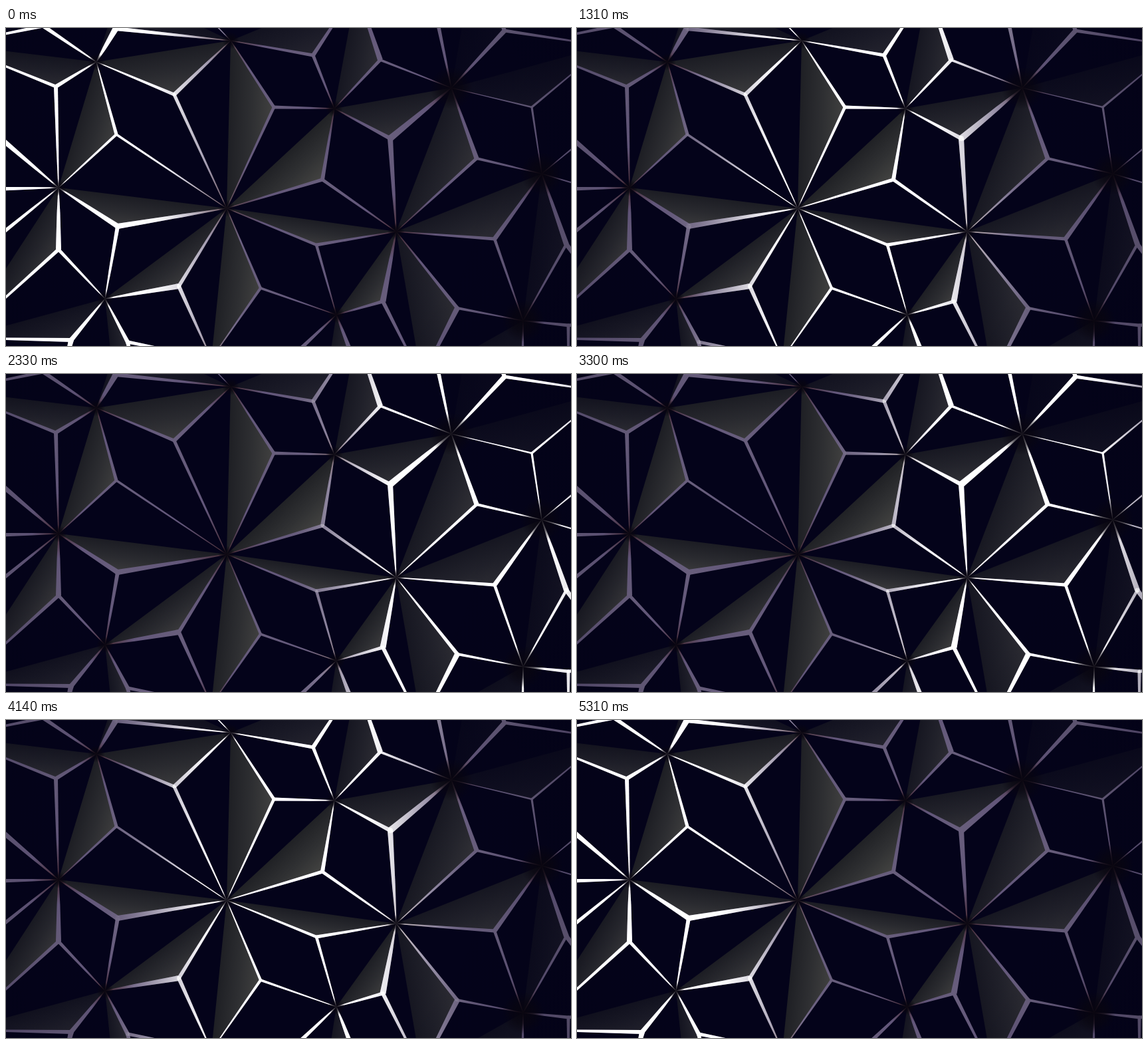
An HTML page that plays this animation: 850x478 px, repeating every 5480 ms.

```html
<!DOCTYPE html>
<html lang="en">
<head>
<meta charset="utf-8">
<title>Faceted wall</title>
<style>
  html, body { margin: 0; width: 100%; height: 100%; overflow: hidden; background: #04031a; }
  svg { display: block; width: 850px; height: 478px; }
</style>
</head>
<body>
<svg viewBox="0 0 850 478">
  <defs>
    <linearGradient id="band" gradientUnits="userSpaceOnUse" x1="-175" y1="0" x2="380" y2="0"></linearGradient>
    <radialGradient id="pit">
      <stop offset="0" stop-color="#08050f" stop-opacity=".95"/>
      <stop offset=".5" stop-color="#08050f" stop-opacity=".65"/>
      <stop offset="1" stop-color="#08050f" stop-opacity="0"/>
    </radialGradient>
    <radialGradient id="shade" gradientUnits="userSpaceOnUse" cx="400" cy="235" r="540">
      <stop offset=".55" stop-color="#020110" stop-opacity="0"/>
      <stop offset="1" stop-color="#020110" stop-opacity=".25"/>
    </radialGradient>
  </defs>
  <rect width="850" height="478" fill="#04031a"/>
  <g id="faces"></g>
  <g id="gaps"></g>
  <rect width="850" height="478" fill="url(#shade)"/>
  <g id="light" fill="url(#band)"></g>
  <g id="pits"></g>
</svg>
<script>
const NS = 'http://www.w3.org/2000/svg';
const $ = id => document.getElementById(id);
const defs = document.querySelector('defs');
const band = $('band');

function add(parent, tag, attrs) {
  const el = document.createElementNS(NS, tag);
  for (const key in attrs) el.setAttribute(key, attrs[key]);
  parent.appendChild(el);
  return el;
}

let gradients = 0;
function gradient(x1, y1, x2, y2, stops) {
  const id = 'g' + gradients++;
  const el = add(defs, 'linearGradient', { id, gradientUnits: 'userSpaceOnUse', x1, y1, x2, y2 });
  for (const [offset, color] of stops) add(el, 'stop', { offset, 'stop-color': color });
  return `url(#${id})`;
}

// Peaks where facets meet; several lie outside the stage.
const hubs = {
  A: [136, 51], B: [338, 19], C: [494, 121], D: [670, 90], E: [806, 219],
  F: [79, 240], G: [332, 271], H: [587, 306], I: [149, 407], J: [497, 431],
  K: [778, 440], L: [309, 497], M: [625, 526], N: [-68, 466], O: [-81, 25],
  P: [527, -58], Q: [165, 560], R: [902, 27], S: [172, -60], T: [705, -110],
  U: [88, 510], V: [192, 510], W: [480, 540], X: [846, 540], Y: [930, 440]
};

// A bright facet spans two hubs and the joint, dark along the ridge between the hubs.
function face(x, y, pair, level) {
  const [[ax, ay], [bx, by]] = [...pair].map(name => hubs[name]);
  const dx = bx - ax, dy = by - ay;
  const u = ((x - ax) * dx + (y - ay) * dy) / (dx * dx + dy * dy);
  const fill = gradient(ax + u * dx, ay + u * dy, x, y,
    [[0, '#202125'], [.5, '#303133'], [1, '#444442']]);
  add($('faces'), 'polygon', { points: [x, y, ax, ay, bx, by].join(' '), fill, opacity: level });
}

// A gap is wide at the joint and narrows towards the hub, faster at the end.
function gap(x, y, [hx, hy], width) {
  const dx = hx - x, dy = hy - y, len = Math.hypot(dx, dy);
  const at = (u, half) => [x + dx * u - dy / len * half, y + dy * u + dx / len * half];
  const outline = [[0, width / 2], [.6, width * .3], [1, .5]];
  const left = outline.map(([u, half]) => at(u, half));
  const right = outline.map(([u, half]) => at(u, -half)).reverse();
  const points = [...left, ...right].join(' ');
  const fill = gradient(x, y, hx, hy, [[0, '#685e7c'], [.6, '#62567a'], [1, '#4a2d34']]);
  add($('gaps'), 'polygon', { points, fill });
  add($('light'), 'polygon', { points });
}

// widths: gap width per hub; lit: brightness of bright facets per hub pair
function joint(x, y, widths, lit = {}) {
  for (const pair in lit) face(x, y, pair, lit[pair]);
  for (const name in widths) gap(x, y, hubs[name], widths[name]);
  const sorted = Object.values(widths).sort((a, b) => b - a);
  const r = (sorted[1] || sorted[0]) / 2;
  add($('gaps'), 'circle', { cx: x, cy: y, r, fill: '#685e7c' });
  add($('light'), 'circle', { cx: x, cy: y, r });
}

joint(56, -3, { A: 6, O: 5 });
joint(165, 1, { A: 9, B: 6, S: 6 }, { SA: .5, BS: .45 });
joint(75, 88, { A: 6, O: 5, F: 6 }, { AO: .65 });
joint(166, 160, { A: 5, F: 4, G: 3.4 }, { AF: .9 });
joint(253, 100, { A: 5, B: 6, G: 5 }, { AB: .85 });
joint(403, 119, { B: 5, C: 5, G: 4.5 }, { BG: .95 });
joint(462, 41, { B: 5, C: 5, P: 6 }, { BP: .5 });
joint(563, 48, { C: 5, D: 3.5, P: 8 }, { CP: .65 });
joint(578, 166, { C: 6, D: 10, H: 8 }, { CD: .7 });
joint(708, 196, { D: 7, E: 4, H: 5 }, { DH: .7 });
joint(476, 228, { C: 6, G: 5, H: 5 }, { CG: 1 });
joint(168, 298, { F: 8, G: 8, I: 6 }, { FG: .85 });
joint(79, 333, { F: 8, I: 5, N: 5.5 }, { FN: .8 });
joint(260, 388, { I: 8, G: 5.5, L: 6 }, { GI: .85 });
joint(383, 391, { G: 4, J: 3.5, L: 4 }, { GL: .95 });
joint(467, 326, { G: 4.5, H: 5, J: 4.5 }, { GH: .85 });
joint(567, 411, { H: 9, J: 5, M: 6 }, { HJ: .9 });
joint(679, 421, { H: 5.5, K: 4, M: 8 }, { HM: .65 });
joint(735, 317, { H: 5, E: 7, K: 4.5 }, { EH: .65 });
joint(791, 119, { D: 2.4, E: 3.2, R: 3.4 }, { DR: .25 });
joint(843, 325, { E: 8, K: 4.5, Y: 7 }, { EK: .3 });
joint(750, 4, { D: 7, R: 5, T: 6 }, { DT: .12 });
joint(98, 469, { I: 7, N: 6, U: 8 }, { IN: .5 });
joint(183, 472, { I: 6, L: 5, V: 6 }, { IQ: .6 });
joint(846, 447, { K: 5, X: 5, Y: 5 });

// Joints beyond the edges of the stage
joint(314, -6, { B: 2 });
joint(648, -15, { D: 6 });
joint(-15, 160, { F: 8 });
joint(-20, 242, { F: 6 });
joint(-20, 320, { F: 6 });
joint(440, 485, { J: 6 });
joint(519, 488, { J: 7 }, { JW: .6 });
joint(777, 520, { K: 5 }, { KM: .4 });
joint(880, 158, { E: 3 });
joint(880, 241, { E: 3 });

// Hubs sink into the dark, more deeply on the right side.
for (const [cx, cy] of Object.values(hubs)) {
  add($('pits'), 'circle', { cx, cy, r: cx > 640 ? 32 : 13, fill: 'url(#pit)' });
}

// Light profile: soft rise, plateau, soft fall
const smooth = u => u * u * (3 - 2 * u);
function lightStop(x, alpha) {
  add(band, 'stop', { offset: (x + 175) / 555, 'stop-color': '#fff', 'stop-opacity': alpha });
}
for (let i = 0; i <= 8; i++) lightStop(-175 + 170 * i / 8, smooth(i / 8));
for (let i = 0; i <= 8; i++) lightStop(205 + 175 * i / 8, 1 - smooth(i / 8));

const LOOP = 5480, STEP = 30, COUNT = 80, SPEED = 8.35;
const stepsSince = (t, from) =>
  t < from ? 0 : Math.min(COUNT, Math.floor((t - from) / STEP) + 1);

const start = performance.now();
function draw() {
  const t = (performance.now() - start) % LOOP;
  const k = stepsSince(t, 200) - stepsSince(t, 2940);
  band.setAttribute('gradientTransform', `translate(${k * SPEED} 0)`);
  requestAnimationFrame(draw);
}
draw();
</script>
</body>
</html>
```
